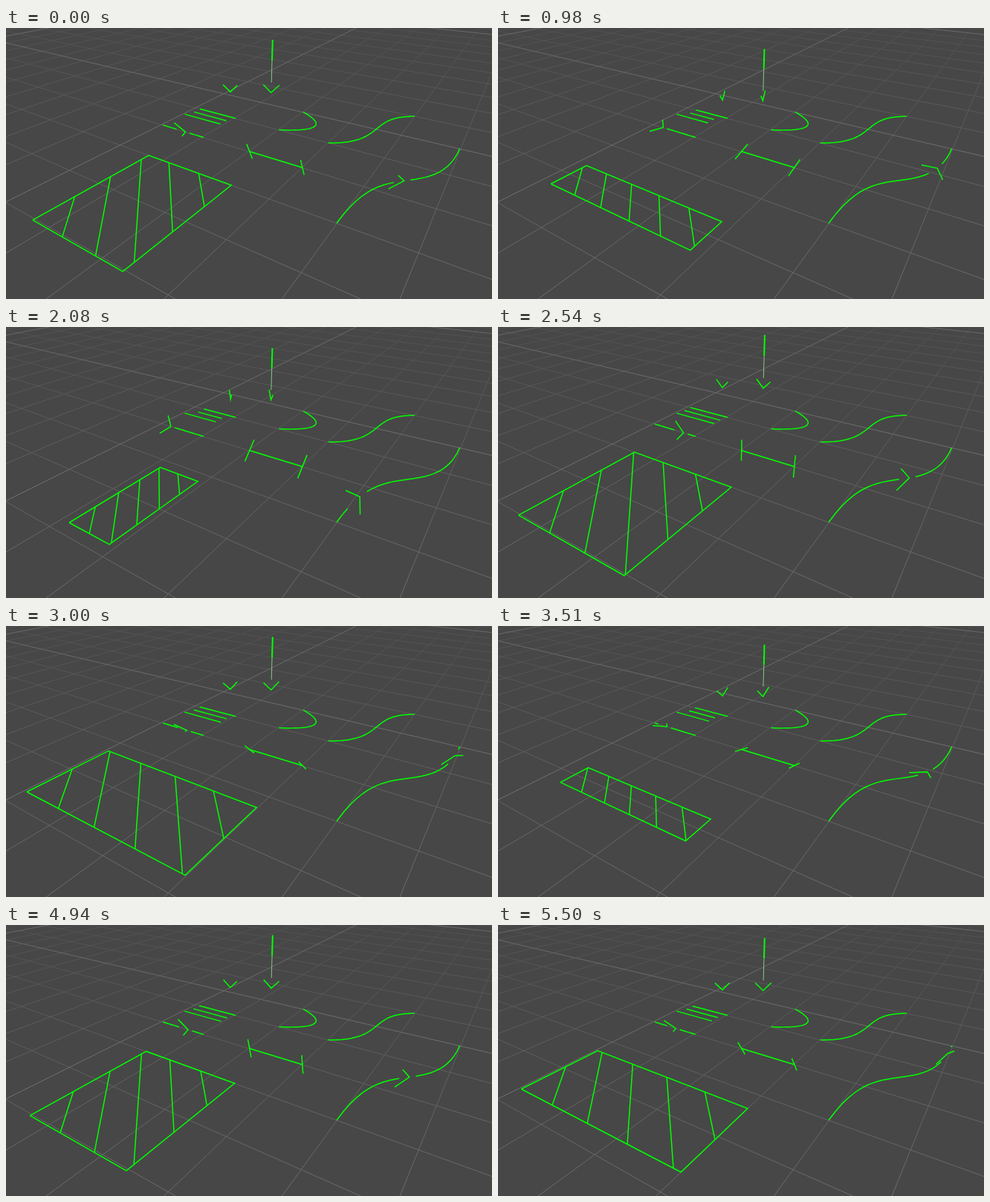
An HTML page with a canvas for the animation above (5.65 s loop, 654x366 px).

```html
<!DOCTYPE html>
<html>
<head>
<meta charset="utf-8">
<style>
html, body { margin: 0; width: 100%; height: 100%; overflow: hidden; background: #474747; }
canvas { display: block; }
</style>
</head>
<body>
<canvas id="stage" width="654" height="366"></canvas>
<script>
const ctx = document.getElementById('stage').getContext('2d');
const LOOP = 5650, SPIN = 1228, TAU = 2 * Math.PI;
const GREEN = '#00ff00', PALE = '#84c884';

// Runs of evenly stepped pictures: [first, last, count]
const RUNS = [[80, 600, 11], [650, 1210, 12], [1240, 1800, 13], [1850, 2410, 13], [2460, 3000, 13],
  [3050, 3610, 13], [3660, 4200, 13], [4250, 4810, 13], [4860, 5400, 13], [5450, 5500, 2]];

function stepTime(t) {
  const run = RUNS.filter(r => r[0] <= t).pop();
  if (!run) return 0;
  const [first, last, count] = run, step = (last - first) / (count - 1);
  return Math.min(last, first + step * Math.floor((t - first) / step + 0.3));
}

// World to screen: x runs right, w towards the viewer, y up
function project([x, w, y = 0]) {
  const d = 1 - 0.0503 * x - 0.0808 * w - 0.0546 * y;
  return [(295 + 32.4 * x - 59 * w - 17.85 * y) / d,
          (89 + 6.59 * x + 10.42 * w - 61.15 * y) / d];
}

function stroke(points, color = GREEN, width = 1.5) {
  ctx.beginPath();
  for (const p of points) ctx.lineTo(...p);
  ctx.strokeStyle = color;
  ctx.lineWidth = width;
  ctx.stroke();
}

const path = (points, color, width) => stroke(points.map(project), color, width);

function bezier(p, t) {
  const s = 1 - t, b = [s * s * s, 3 * s * s * t, 3 * s * t * t, t * t * t];
  return [0, 1].map(i => b.reduce((sum, k, j) => sum + k * p[j][i], 0));
}

function curve(at, from = 0, to = 1) {
  from = Math.max(0, from);
  to = Math.min(1, to);
  if (to <= from) return;
  const n = Math.ceil(24 * (to - from));
  path(Array.from({ length: n + 1 }, (_, i) => at(from + (to - from) * i / n)));
}

function shade(top, bottom) {
  const g = ctx.createLinearGradient(0, 0, 0, 366);
  g.addColorStop(0, top);
  g.addColorStop(1, bottom);
  return g;
}
const minor = shade('#505050', '#6c6c6c'), major = shade('#686868', '#747474');

function grid() {
  for (const main of [false, true])
    for (let k = -18; k <= 6; k++) {
      if ((k % 10 === 0) !== main) continue;
      const color = main ? major : minor;
      stroke([[730, -129], [-263.4 + 158.7 * k, 366]], color, 1);
      stroke([[-644, -131], [1475 - 249.4 * k, 366]], color, 1);
    }
}

function hatchedBox(theta) {
  const w = 1.8 + 1.2 * Math.sin(theta), h = 1.2 + 0.82 * Math.cos(theta);
  const left = 1.5 - w / 2, near = 4.01 + h / 2;
  const at = (x, z) => [left + x, near - z];
  path([at(0, 0), at(w, 0), at(w, h), at(0, h), at(0, 0)]);
  for (let k = 1; k < 6; k++) {
    const d = k * (w + h) / 6, x = Math.min(d, w), z = Math.min(d, h);
    path([at(d - z, z), at(x, d - x)]);
  }
}

// Arrow riding along a curve, its head turning about the direction of travel
function rider(at, tip, before, after, angle) {
  curve(at, 0, tip - before);
  curve(at, tip + after, 1);
  const [x, w] = at(tip), [x0, w0] = at(tip - 0.01), [x1, w1] = at(tip + 0.01);
  const len = Math.hypot(x1 - x0, w1 - w0), tx = (x1 - x0) / len, tw = (w1 - w0) / len;
  const wing = r => [x - 0.18 * tx - r * Math.sin(angle) * tw,
                     w - 0.18 * tw + r * Math.sin(angle) * tx, r * Math.cos(angle)];
  path([wing(0.19), [x, w], wing(-0.19)]);
}

// Head pointing down, turning about the vertical
function chevron(x, w, y, size, angle) {
  const wing = r => [x + r * Math.cos(angle), w - r * Math.sin(angle), y + size];
  path([wing(size), [x, w, y], wing(-size)]);
}

const straight = t => [t, 2];
const arc = t => [2 + 2 * t * (1 - t), t];
const wave = t => bezier([[3, 1], [3.9, 0.5], [3.2, -0.5], [4, -1]], t);
const road = t => bezier([[4, 3], [4, 1], [5, 2], [5, 0]], t);

function draw(t) {
  const angle = 0.45 - TAU * t / SPIN;
  const bob = Math.sin(TAU * (t + 25) / SPIN);
  const theta = TAU * (t - 36) / (2 * SPIN);

  ctx.fillStyle = '#474747';
  ctx.fillRect(0, 0, 654, 366);
  grid();
  hatchedBox(theta);

  rider(straight, 0.53 + 0.33 * bob, 0.22, 0.1, angle);
  rider(road, 0.515 + 0.43 * Math.sin(theta), 0.08, 0.05, angle);
  curve(arc);
  curve(wave);

  const inset = 0.1 - 0.1 * bob;
  path([[inset, 1], [1, 1]]);
  path([[inset, 1.19], [1 - inset, 1.19]]);
  path([[0, 1.38], [1 - inset, 1.38]]);

  path([[2, 2], [3, 2]]);
  for (const x of [2, 3])
    path([-0.2, 0.2].map(r => [x, 2 + r * Math.sin(angle), r * Math.cos(angle)]));

  const lift = 0.01 + 0.18 * bob, ax = 0.894, aw = -0.553;
  chevron(0.079, -0.093, lift, 0.165, angle);
  chevron(ax, aw, lift, 0.183, angle);
  path([[ax, aw, lift + 0.74], [ax, aw, lift + 0.24]], PALE, 1);
  path([[ax, aw, lift + 1.18], [ax, aw, lift + 0.74]], GREEN, 2);
}

const start = performance.now();
function tick() {
  draw(stepTime((performance.now() - start) % LOOP));
  requestAnimationFrame(tick);
}
tick();
</script>
</body>
</html>
```
